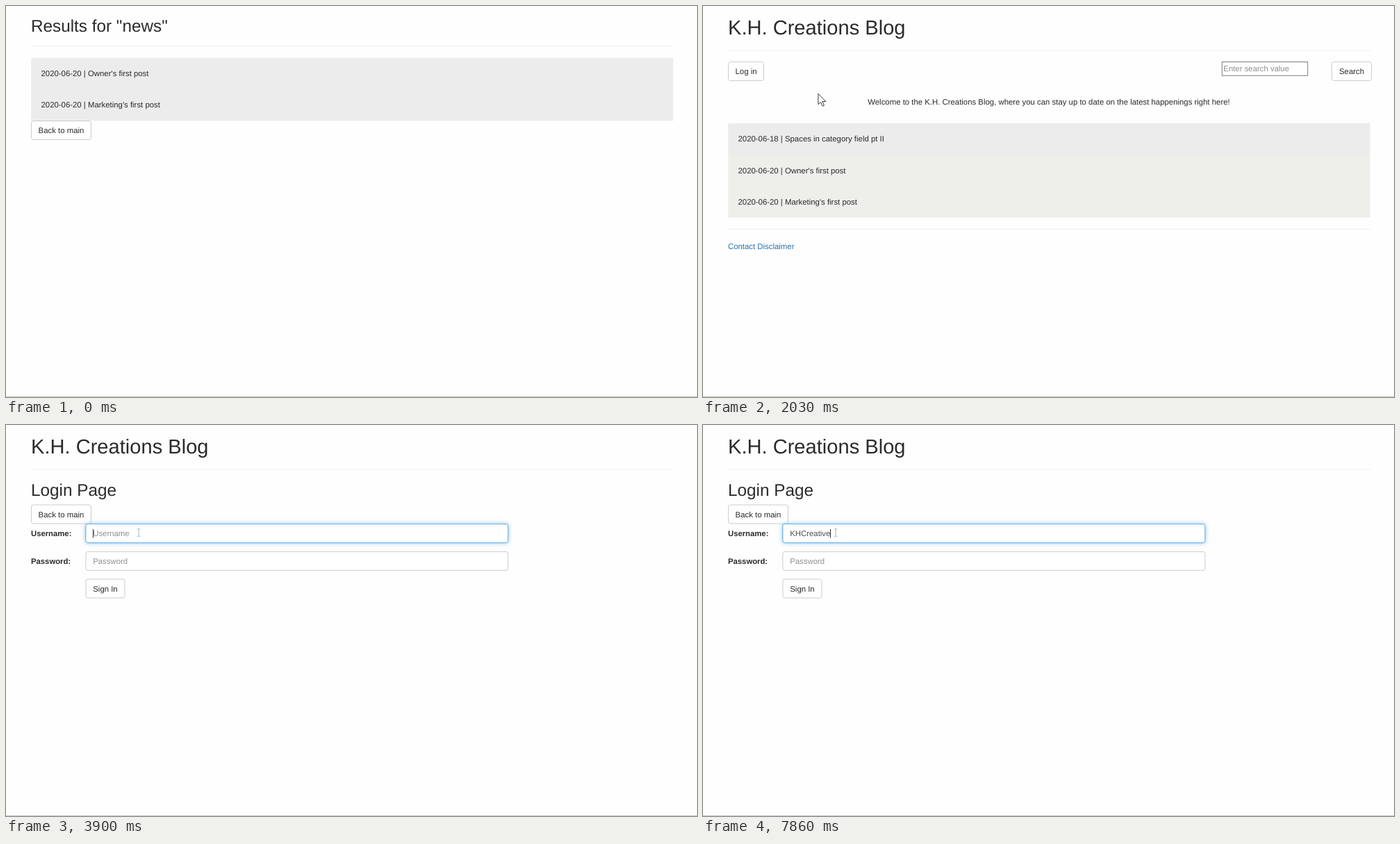
These frames come from a looping animation (995x563 px, 8 s). An HTML page:

```html
<!DOCTYPE html>
<html lang="en">
<head>
<meta charset="utf-8">
<title>Blog login</title>
<style>
html, body { margin: 0; width: 100%; height: 100%; overflow: hidden; background: #fefefe; }
svg { display: block; width: 995px; height: 563px; }
text { font: 11.38px "Liberation Sans", Arial, sans-serif; fill: #2b2b2b; text-rendering: geometricPrecision; white-space: pre; }
.h1 { font-size: 29.1px; }
.h2 { font-size: 24.3px; }
.bold { font-weight: bold; font-size: 11.3px; }
.hint { fill: #8f8f8f; }
.typed { fill: #505050; }
.link { fill: #2a71ae; }
.btn, .field { fill: #fff; stroke: #ccc; }
.btn.hover { fill: #e6e6e6; stroke: #adadad; }
.hr { fill: #eee; }
#glow { fill: #fff; stroke: #66afe9; filter: drop-shadow(0 0 3px rgba(102, 175, 233, .7)); }
</style>
</head>
<body>
<svg id="stage" viewBox="0 0 995 563"></svg>
<script>
const LOOP = 8000, STEP = 77;
const COMPANY = "K.H. Creations";
const USER = "KHCreative";
const OPEN_MAIN = 1160, OPEN_LOGIN = 2900;

const rect = (x, y, w, h, attrs) => `<rect x="${x}" y="${y}" width="${w}" height="${h}" ${attrs}/>`;
const text = (x, y, str, cls = "", anchor = "start") =>
  `<text x="${x}" y="${y}" class="${cls}" text-anchor="${anchor}">${str}</text>`;
const rule = y => rect(36, y, 924.5, 1, 'class="hr"');
const button = (x, y, w, label, id = "") =>
  rect(x, y, w, 27, `rx="3" class="btn" id="${id}"`) + text(x + w / 2, y + 17.5, label, "", "middle");
const field = (y, attrs) => rect(114.9, y, 608, 27, `rx="3" ${attrs}`);
const header = text(36, 41.3, COMPANY + " Blog", "h1") + rule(63.5);
const post = (y, str) => text(50.5, y, str);

const results = text(36, 37, 'Results for "news"', "h2") + rule(57.3)
  + rect(36.2, 74.7, 924.4, 90.6, 'fill="#ececec"')
  + post(101, "2020-06-20 | Owner's first post")
  + post(146.4, "2020-06-20 | Marketing's first post")
  + button(36.5, 165.5, 86, "Back to main", "back");

const main = header
  + button(36.5, 80.5, 51, "Log in", "login")
  + rect(747.4, 80.5, 123.3, 19.7, 'fill="#fff" stroke="#7c7c7c"')
  + text(749.3, 94, "Enter search value", "hint")
  + button(905.5, 80.5, 57, "Search")
  + text(498, 142, `Welcome to the ${COMPANY} Blog, where you can stay up to date on the latest happenings right here!`, "", "middle")
  + rect(36.2, 168.7, 924.4, 45.3, 'fill="#ececed"')
  + rect(36.2, 214, 924.4, 90.6, 'fill="#eeeeea"')
  + post(195, "2020-06-18 | Spaces in category field pt II")
  + post(240.5, "2020-06-20 | Owner's first post")
  + post(286, "2020-06-20 | Marketing's first post")
  + rule(321)
  + text(36, 349.5, "Contact Disclaimer", "link");

const login = header + text(36, 102, "Login Page", "h2")
  + button(36.5, 115, 86, "Back to main")
  + text(36, 160, "Username:", "bold") + text(36, 199.7, "Password:", "bold")
  + field(142.6, 'class="field"') + field(142.6, 'id="glow"')
  + field(182.4, 'class="field"')
  + text(125.2, 160, "Username", "hint").replace("<text", '<text id="hint"')
  + text(125.2, 160, "", "typed").replace("<text", '<text id="typed"')
  + text(125.2, 199.7, "Password", "hint")
  + button(115, 222, 56, "Sign In")
  + rect(0, 150, 1, 12.5, 'id="caret" fill="#333"');

const pointers = {
  arrow: '<path d="M0 0V15.5L3.6 12.2L6.2 18L8.5 17L6 11.3H11Z" fill="#fff" stroke="#222" stroke-width=".9"/>',
  hand: `<path d="M-1.2 8V.8Q-1 -.8 0 -.8T1.3 .8V5Q2.4 4.2 3.4 5.4Q4.6 4.8 5.3 6Q6.6 5.8 6.6 7.5V10Q6.4 12.3 5.3 14.5H-1
    Q-2.8 11.5 -4.7 9.2Q-5 7.4 -3.4 7.2Q-2 7.2 -1.2 8.6M1.3 5V8M3.4 5.5V8M5.3 6.2V8" fill="#fff" stroke="#222" stroke-width=".9"/>`,
  beam: '<path d="M-2.3 -5.3H-.6L0 -4.8L.6 -5.3H2.3M0 -4.8V4.8M-2.3 5.3H-.6L0 4.8L.6 5.3H2.3" fill="none"/>'
};

const group = (id, body) => `<g id="${id}">${body}</g>`;
stage.innerHTML = group("results", results) + group("main", main) + group("signin", login)
  + rect(0, 562, 995, 1, 'fill="#c8c8c8"')
  + rect(-1, 548.5, 90.5, 13.5, 'id="status" fill="#f8f8f8" stroke="#dcdcdc"')
  + group("pointer", Object.entries(pointers).map(([k, p]) => group(k, p)).join(""));

const $ = id => document.getElementById(id);
const show = (id, on) => { $(id).style.display = on ? "" : "none"; };
const within = (t, a, b) => t >= a && t < b;

// start, end, from x, y, to x, y
const moves = [
  [70, 610, 734, 491, 80, 190],
  [1240, 1640, 80, 190, 240, 150],
  [1790, 2430, 240, 150, 78, 98],
  [2730, 2820, 78, 98, 108, 104.5],
  [2820, 3210, 108, 104.5, 175, 110],
  [3440, 3600, 175, 110, 191, 155]
];
const kinds = [[70, "arrow"], [606, "hand"], [1315, "arrow"], [2400, "hand"],
  [2820, "beam"], [2970, "arrow"], [3590, "beam"]];
const keys = [4760, 4910, 6380, 6640, 6710, 6790, 7100, 7630, 7710, 7860];
const caretOn = [[3760, 4290], [4830, 5370], [5850, 6380], [6940, 7480], [7860, LOOP]];

function pointerAt(t) {
  const [start, end, x0, y0, x1, y1] = moves.findLast(m => m[0] <= t);
  const count = Math.round((end - start) / STEP);
  const u = Math.min(1, Math.floor((t - start) / STEP) / count);
  const e = 1 - (1 - u) ** 1.3;
  return [x0 + (x1 - x0) * e, y0 + (y1 - y0) * e];
}

function draw(t) {
  show("results", t < OPEN_MAIN);
  show("main", within(t, OPEN_MAIN, OPEN_LOGIN));
  show("signin", t >= OPEN_LOGIN);
  show("status", within(t, 1010, 1315) || within(t, 2400, OPEN_LOGIN));
  $("back").classList.toggle("hover", t >= 606);
  $("login").classList.toggle("hover", t >= 2400);

  const kind = kinds.findLast(k => k[0] <= t)?.[1];
  for (const k in pointers) show(k, k === kind);
  if (kind) $("pointer").setAttribute("transform", `translate(${pointerAt(t)})`);
  $("beam").setAttribute("stroke", t < 3590 ? "#444" : "#9db4c6");

  const typed = USER.slice(0, keys.filter(k => k <= t).length);
  $("typed").textContent = typed;
  show("hint", !typed);
  $("glow").style.opacity = t < 3760 ? 0 : Math.min(1, (t - 3690) / 210);
  show("caret", caretOn.some(([a, b]) => within(t, a, b)));
  const width = typed && t >= OPEN_LOGIN ? $("typed").getComputedTextLength() : 0;
  $("caret").setAttribute("x", Math.round(125 + width));
}

function tick() {
  draw(performance.now() % LOOP);
  requestAnimationFrame(tick);
}
tick();
</script>
</body>
</html>
```
